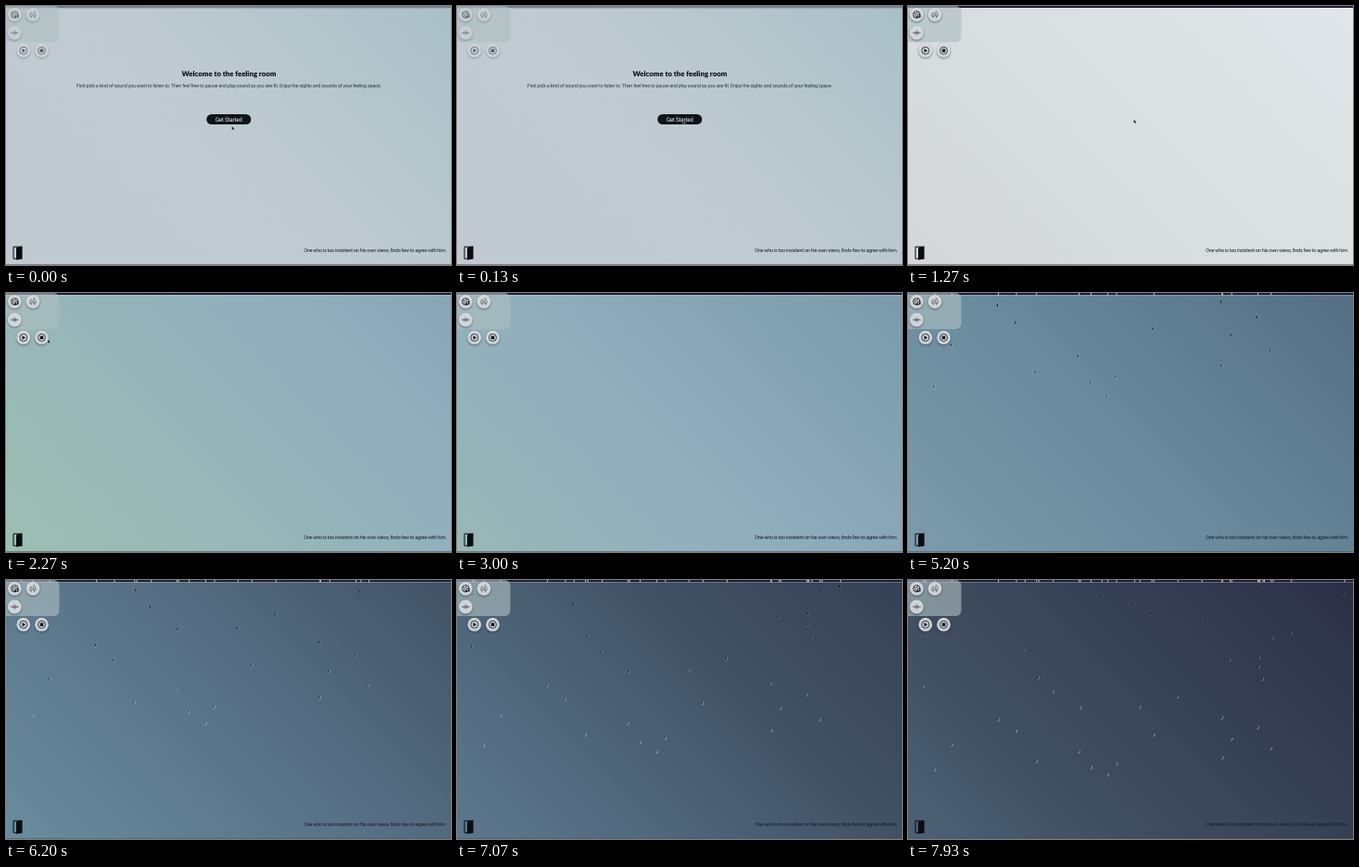
Write an HTML page that moves like this. It is 480x280 px and loops after 8 s.

```html
<!DOCTYPE html>
<html lang="en">
<head>
<meta charset="utf-8">
<title>Feeling room</title>
<style>
  html, body { margin: 0; width: 100%; height: 100%; overflow: hidden; }
  svg { display: block; width: 100vw; height: 100vh; }
  text { font-family: Roboto, sans-serif; font-size: 5.5px; letter-spacing: -.25px; text-rendering: geometricPrecision; }
  .title { font: 900 7.8px Lato, sans-serif; letter-spacing: 0; }
  .disc { fill: #e2e7e9; fill-opacity: .86; filter: drop-shadow(.8px 1.2px 1.2px rgba(20, 30, 40, .6)); }
  .ink { fill: none; stroke: #16191d; stroke-width: .8; }
  .thin { stroke: #3c4349; stroke-width: .55; }
  .solid { fill: #111418; }
</style>
</head>
<body>
<svg viewBox="0 0 480 280" preserveAspectRatio="none">
  <defs>
    <!-- One long diagonal palette that slides across the stage -->
    <linearGradient id="sky" gradientUnits="userSpaceOnUse" x1="-330" y1="710" x2="1190" y2="-810">
      <stop offset=".06" stop-color="#9cbfb2"/>
      <stop offset=".25" stop-color="#91aebd"/>
      <stop offset=".5" stop-color="#688a9c"/>
      <stop offset=".625" stop-color="#566f85"/>
      <stop offset=".75" stop-color="#404f61"/>
      <stop offset=".925" stop-color="#2c3046"/>
    </linearGradient>
    <linearGradient id="pale" gradientUnits="userSpaceOnUse" x1="50" y1="330" x2="430" y2="-50">
      <stop stop-color="#d3d7d9"/><stop offset="1" stop-color="#e0e6e9"/>
    </linearGradient>
    <linearGradient id="mist" gradientUnits="userSpaceOnUse" x1="50" y1="330" x2="430" y2="-50">
      <stop stop-color="#c2c9d1"/><stop offset=".5" stop-color="#c0cbd1"/><stop offset="1" stop-color="#aabfc7"/>
    </linearGradient>
  </defs>
  <rect width="480" height="280" fill="url(#sky)"/>
  <rect id="dawn" width="480" height="280" fill="url(#pale)"/>
  <rect y="1.7" width="480" height="1" fill="#fff" opacity=".35"/>
  <rect width="480" height="2" fill="#1e2036"/>
  <g id="rain"></g>

  <g id="welcome" text-anchor="middle">
    <rect width="480" height="280" fill="url(#mist)"/>
    <rect width="480" height="2.3" fill="#75828c"/>
    <text class="title" x="240.5" y="75.7" fill="#0d1015">Welcome to the feeling room</text>
    <text x="240.3" y="88.3" fill="#2f3942">First pick a kind of sound you want to listen to. Then feel free to pause and play sound as you see fit. Enjoy the sights and sounds of your feeling space.</text>
    <rect x="216.3" y="117" width="48" height="11" rx="5.5" fill="#10141b"/>
    <text x="240.2" y="124.8" style="font-size:6.3px" fill="#eef1f3">Get Started</text>
  </g>

  <rect y="279" width="480" height="1" fill="#4d5964" opacity=".6"/>
  <rect x="-8" width="65.5" height="39" rx="6" fill="#adbfc0" opacity=".62"/>
  <g id="controls">
    <g transform="translate(9.3 9.3)">
      <circle class="disc" r="7.4"/>
      <circle class="ink" r="3.7"/>
      <path class="ink" d="M-3.3-1.5Q0 .6 1.5-3.3M-3 2Q-.5-.5 0 3.6M1 3V.2L3.6-.4V2.5"/>
      <path class="solid" d="M.2 2h1.5v1.6H.2zM2.6 1.5h1.5v1.6H2.6z"/>
    </g>
    <g transform="translate(29 9.3)">
      <circle class="disc" r="7.4"/>
      <path class="ink thin" d="M-2 4V1M-2 2.2Q-5 2-2-2.4Q.4 2-2 2.2M1.7 4V-.5M1.7 2.4Q-1.2 2 1.4-4Q5.2 2 1.7 2.4"/>
    </g>
    <g transform="translate(9.3 29)">
      <circle class="disc" r="7.4"/>
      <path class="ink thin" d="M-4.5 0h9M-2.5-.9v1.8M-1.2-1.6v3.2M0-2.6v5.2M1.2-1.6v3.2M2.5-.9v1.8"/>
    </g>
    <g transform="translate(18.8 48.2)">
      <circle class="disc" r="7.4"/>
      <circle class="ink" r="4"/>
      <path class="solid" d="M-1.3-2.2L2.3 0L-1.3 2.2Z"/>
    </g>
    <g transform="translate(38.5 48.2)">
      <circle class="disc" r="7.4"/>
      <circle class="ink" r="4"/>
      <path class="solid" d="M-1.8-1.8h3.6v3.6h-3.6z"/>
    </g>
  </g>

  <path d="M16.5 260.3H8V273.2H11.5" fill="none" stroke="#0b0d10"/>
  <path d="M17.6 259.8H16L11 261.6V274.6L17.6 273.4Z" fill="#0b0d10"/>
  <text x="475" y="265.5" text-anchor="end" fill="#161c28">One who is too insistent on his own views, finds few to agree with him.</text>
  <path id="cursor" d="M0 0V4.4L1.1 3.5L1.9 5.1L2.7 4.7L1.9 3.2H3.2Z" fill="#080808" stroke="#fff" stroke-width=".35"/>
</svg>
<script>
// Times in seconds, lengths in pixels
const LOOP = 8, ENTER = 1.27, FADE = 1;
const RAIN_START = 3.15, RAIN_GAP = .137;
const FALL = 62.5, DRAG = 3.9, TOP = 2;
const DRIFT = 165;
const $ = id => document.getElementById(id);

let seed = 11;
const random = () => (seed = seed * 16807 % 2147483647) / 2147483647;
const progress = (t, from, length) => Math.min(1, Math.max(0, (t - from) / length));
const smooth = k => k * k * (3 - 2 * k);

function add(parent, tag, attrs = {}) {
  const el = document.createElementNS('http://www.w3.org/2000/svg', tag);
  for (const key in attrs) el.setAttribute(key, attrs[key]);
  return parent.appendChild(el);
}

function makeDrop(i) {
  const x = 8 + 464 * random();
  const birth = RAIN_START + RAIN_GAP * (i + random());
  const group = add($('rain'), 'g');
  add(group, 'rect', { x: x - .5, width: 1, height: 2.2, fill: '#fff', opacity: .75 });
  const body = add(group, 'g');
  const dark = add(body, 'path', { d: 'M-.2-1.6V1.1', stroke: '#0c1420', 'stroke-width': 1.2 });
  const shine = add(body, 'path', { d: 'M.8-1.5V.5Q.8 1.6-.8 1.5', fill: 'none', stroke: '#fff', 'stroke-width': .75 });
  return { x, birth, group, body, dark, shine };
}

random();
const drops = Array.from({ length: Math.floor((LOOP - RAIN_START) / RAIN_GAP) }, (_, i) => makeDrop(i));

function drawDrop(d, t) {
  const age = t - d.birth;
  d.group.style.display = age < 0 ? 'none' : '';
  if (age < 0) return;
  const y = TOP + FALL * age - DRAG * age * age;
  d.body.setAttribute('transform', `translate(${d.x - 1 + Math.min(1, age / 4)} ${y})`);
  d.dark.setAttribute('opacity', Math.max(.3, 1 - age * .2));
  d.shine.setAttribute('opacity', Math.min(.6, .2 + age * .15));
}

function drawCursor(t) {
  const rise = progress(t, 0, .13), glide = smooth(progress(t, 1.5, .7));
  const x = 243.5 - 198.5 * glide, y = 129.8 - 7.3 * rise - 72.5 * glide;
  $('cursor').setAttribute('transform', `translate(${x} ${y})`);
  $('cursor').style.display = t < 2.5 ? '' : 'none';
}

function draw(t) {
  const intro = t < ENTER, slide = DRIFT * (t - 4);
  $('sky').setAttribute('gradientTransform', `translate(${-slide} ${slide})`);
  $('dawn').setAttribute('opacity', 1 - progress(t, ENTER, FADE));
  $('welcome').style.display = intro ? '' : 'none';
  $('controls').setAttribute('opacity', intro ? .6 : 1);
  drops.forEach(d => drawDrop(d, t));
  drawCursor(t);
}

const begin = performance.now();
function tick() {
  draw((performance.now() - begin) / 1000 % LOOP);
  requestAnimationFrame(tick);
}
tick();
</script>
</body>
</html>
```
